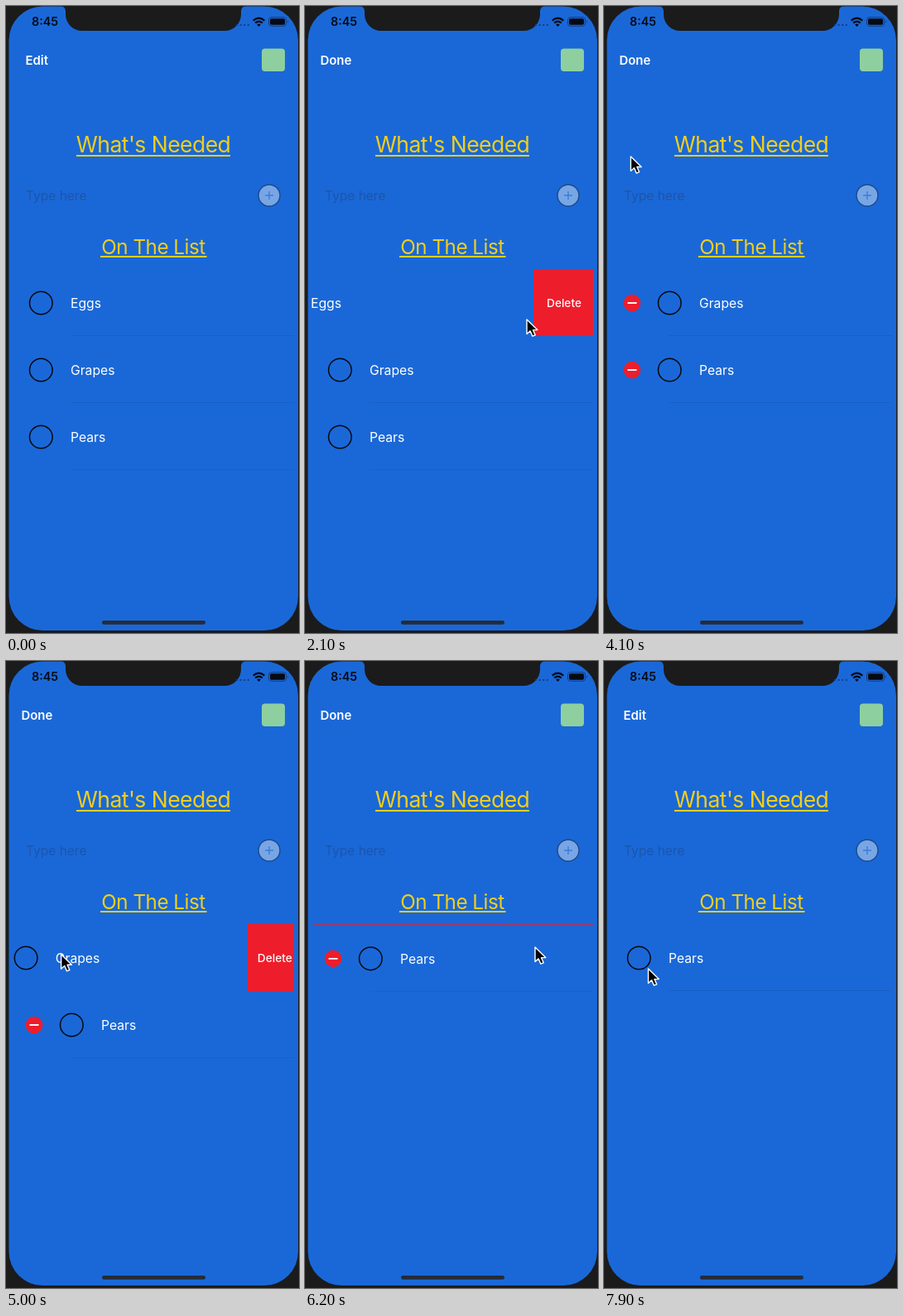
Animation of 354x758 px, one loop 8000 ms. Source, as an HTML page:

```html
<!DOCTYPE html>
<html lang="en">
<head>
<meta charset="utf-8">
<title>Shopping list</title>
<style>
  html, body { margin: 0; width: 100%; height: 100%; overflow: hidden; background: #1b1b1c; }
  svg { display: block; }
  text { font: 15.7px Inter, "Open Sans", sans-serif; fill: #fff; }
  .title { letter-spacing: -.02em; fill: #f2cf1c; text-anchor: middle; }
  .bold { font-size: 14.9px; font-weight: 600; }
  .ring { fill: none; stroke: #05080f; stroke-width: 1.5; }
</style>
</head>
<body>
<svg id="stage" width="354" height="758" viewBox="0 0 354 758">
  <rect width="354" height="758" fill="#1b1b1c"/>
  <rect x="3.5" y="0.5" width="349.500" height="754.500" rx="41" fill="#1a68d7"/>
  <path d="M66 0a6 6 0 0 1 6 6v4a20 20 0 0 0 20 20h172a20 20 0 0 0 20-20v-4a6 6 0 0 1 6-6z" fill="#1b1b1c"/>

  <!-- Status bar -->
  <text x="31" y="24.3" style="font-size:14.3px;font-weight:600;fill:#050a14">8:45</text>
  <path d="M278 23h16" stroke="#123f88" stroke-width="2" stroke-dasharray="2 2.6"/>
  <g fill="none" stroke="#050a14" stroke-width="2.3">
    <path d="M298.7 17.6q6.8-6 13.6 0M301.2 20.5q4.3-3.8 8.6 0"/>
    <path d="M303.2 22.4q2.3-1.8 4.6 0l-2.3 2.6z" fill="#050a14" stroke="none"/>
  </g>
  <rect x="317.5" y="13.7" width="21" height="10.6" rx="3" fill="none" stroke="#123b7c"/>
  <rect x="319" y="15.2" width="18" height="7.6" rx="1.7" fill="#050a14"/>
  <path d="M340 17.2q2 1.8 0 3.6z" fill="#123b7c"/>

  <!-- Header and entry field -->
  <text id="mode" class="bold" y="70.6">Edit</text>
  <rect x="309" y="51.5" width="28" height="27.5" rx="4" fill="#8ecfa0"/>
  <text class="title" x="178" y="176.7" style="font-size:26.5px">What's Needed</text>
  <text class="title" x="178" y="299.8" style="font-size:24.2px">On The List</text>
  <path d="M85 181h186M114 303h128.500" stroke="#f2cf1c" stroke-width="2"/>
  <text x="24" y="235" style="fill:#1c55ac;font-size:15.5px">Type here</text>
  <circle cx="318" cy="229" r="13" fill="#78a6e5" stroke="#1c4a8e" stroke-width="1.4"/>
  <path d="M313 229h10M318 224v10" stroke="#3b7cd6" stroke-width="1.4"/>

  <g id="list"></g>
  <rect x="116" y="743" width="125" height="4.800" rx="2.400" fill="#252b38"/>
  <path id="cursor" d="M0 0V17.500L4.100 13.900L6.900 20.200L10.200 18.800L7.500 12.600H12.800Z"
        fill="#000" stroke="#fff" stroke-width="1.4" stroke-linejoin="round"/>
</svg>
<script>
const LOOP = 8000, STEP = 100, ROW = 81, TOP = 318, LEFT = 8, RIGHT = 348;
const OPEN = 68, FULL = 340;
const $ = id => document.getElementById(id);

// Eased progress from 0 to 1
const ease = (t, start, length) => {
  const u = Math.min(1, Math.max(0, (t - start) / length));
  return (1 - Math.cos(Math.PI * u)) / 2;
};
const during = (t, from, to) => t >= from && t < to;

// Each row: how far it is swiped open, and when it is deleted
const rows = [
  { name: 'Eggs', swipe: t => 71 * ease(t, 1550, 530) - 3 * ease(t, 2120, 150), gone: 2395 },
  { name: 'Grapes', swipe: t => OPEN * ease(t, 4750, 350), gone: 5779 },
  { name: 'Pears', swipe: () => 0, gone: Infinity }
];

// Nested svg elements clip each row to its current height
$('list').innerHTML = rows.map(r => `
  <svg x="${LEFT}" width="${RIGHT - LEFT}" height="${ROW}" viewBox="${LEFT} 0 ${RIGHT - LEFT} ${ROW}">
    <g class="content">
      <g class="minus"><circle cx="-3" cy="41" r="10.3" fill="#ee1d2b"/>
        <path d="M-8.5 41h11" stroke="#fff" stroke-width="1.9"/></g>
      <circle class="ring" cx="42.3" cy="41" r="13.8"/>
      <text x="78" y="46.7">${r.name}</text>
    </g>
    <rect class="red" height="${ROW}" fill="#ee1d2b"/>
    <text class="delete" x="292" y="46" style="font-size:13.7px;font-weight:500">Delete</text>
    <path class="line" d="M78 0H348" stroke="#123f88" stroke-opacity=".22"/>
  </svg>`).join('');
rows.forEach((r, i) => {
  r.box = $('list').children[i];
  for (const part of ['content', 'minus', 'red', 'delete', 'line']) r[part] = r.box.querySelector('.' + part);
});

// Pointer stops: time, x, y
const stops = [
  [900, 358, 430], [1450, 339, 381], [1550, 339, 381], [2080, 268, 379], [2100, 268, 379],
  [2350, 300, 355], [2450, 300, 355], [2800, 274.5, 325], [3400, 34, 62], [3745, 34, 62],
  [4550, 30, 356], [4850, 30, 356], [5450, 280, 347], [5800, 280, 347], [6200, 278, 346],
  [6400, 278, 346], [7050, 38, 63], [7330, 38, 63], [7900, 53.5, 372]
];
function pointer(t) {
  const n = stops.findIndex(s => s[0] > t);
  if (n < 0) return stops[stops.length - 1].slice(1);
  const [t0, x0, y0] = stops[Math.max(0, n - 1)], [t1, x1, y1] = stops[n];
  const k = ease(t, t0, t1 - t0 || 1);
  return [x0 + (x1 - x0) * k, y0 + (y1 - y0) * k];
}

function draw(t) {
  const edit = ease(t, 3550, 300) - ease(t, 7250, 300);
  const done = during(t, 1600, 2900) || during(t, 3550, 7300);
  $('mode').textContent = done ? 'Done' : 'Edit';
  $('mode').setAttribute('x', done ? 18.5 : 23.5);

  let y = TOP;
  for (const r of rows) {
    const out = ease(t, r.gone, 450), height = ROW * (1 - out);
    const shift = r.swipe(t) + (FULL - OPEN) * out;
    const red = shift > 0.5 ? Math.min(FULL, shift + 1) : 0;
    r.box.setAttribute('y', y);
    r.box.setAttribute('height', height);
    r.box.setAttribute('viewBox', `${LEFT} 0 ${RIGHT - LEFT} ${height}`);
    r.box.style.display = height > 0.01 ? '' : 'none';
    r.content.setAttribute('transform', `translate(${37 * edit - shift})`);
    r.minus.setAttribute('opacity', edit);
    r.red.setAttribute('x', RIGHT - red);
    r.red.setAttribute('width', red);
    r.delete.setAttribute('x', Math.max(292, RIGHT - red + 12));
    r.delete.style.display = red ? '' : 'none';
    r.line.setAttribute('transform', `translate(0 ${height - 0.5})`);
    r.line.style.display = red ? 'none' : '';
    y += height;
  }

  $('cursor').setAttribute('transform', `translate(${pointer(t)})`);
  $('cursor').style.display = t < stops[0][0] ? 'none' : '';
}

const begin = performance.now();
function tick() {
  const t = (performance.now() - begin) % LOOP;
  draw(Math.floor(t / STEP) * STEP);
  requestAnimationFrame(tick);
}
tick();
</script>
</body>
</html>
```
